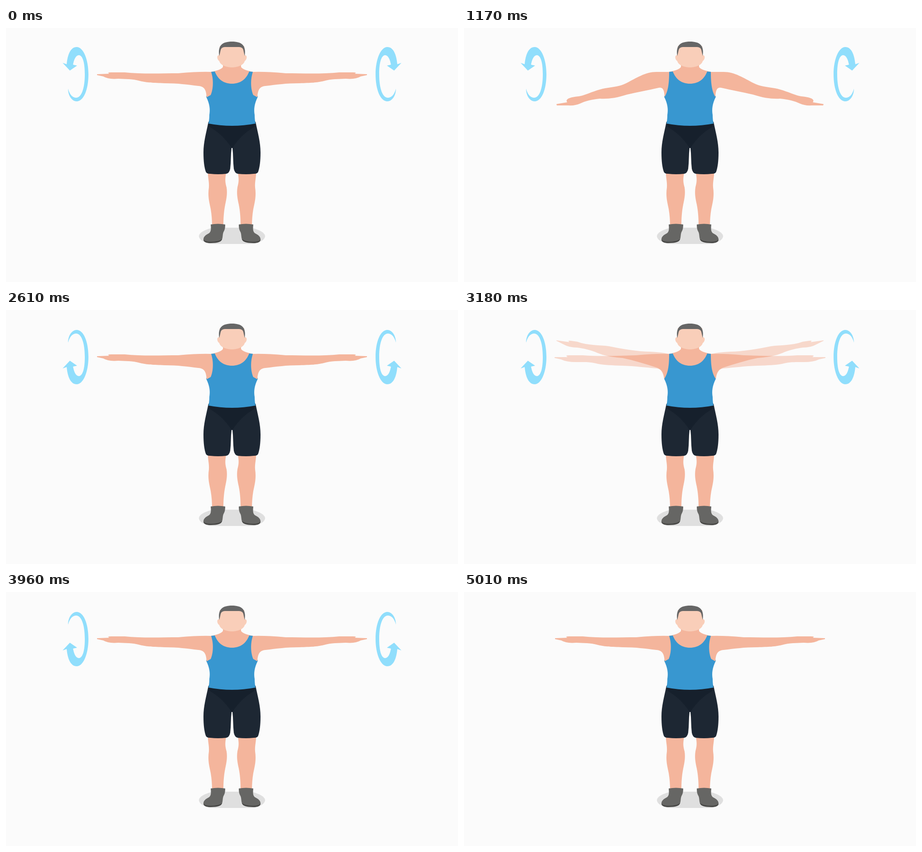
Recreate the animation shown at these times as an HTML page with a canvas. Size 998 by 561 pixels, loop 5040 ms.

```html
<!DOCTYPE html>
<html lang="en">
<head>
<meta charset="utf-8">
<title>Arm circles</title>
<style>
  html, body { margin: 0; width: 100%; height: 100%; overflow: hidden; background: #fbfbfb; }
  canvas { display: block; filter: blur(0.7px); }
</style>
</head>
<body>
<canvas id="stage" width="998" height="561"></canvas>
<script>
const W = 998, H = 561, LOOP = 5040, BLEND = 30;
const ctx = document.getElementById('stage').getContext('2d');

const COLOR = {
  bg: '#fbfbfb', skin: '#f4b59c', face: '#f9ceb9', hair: '#666666', tank: '#3897d0',
  shorts: '#1d2733', hips: '#16202c', shoe: '#666664', sole: '#484846',
  shadow: '#dfdfdf', arrow: '#90defc'
};

// Left-hand shapes are mirrored about the middle of the stage.
const leg = new Path2D('M446 315 C445 330 449 338 448 352 C445 372 449 385 452 400 C454 412 455 424 455 438 L480 438 C480 420 481 405 484 390 C487 376 489 366 487 352 C484 340 483 335 487 315 Z');
const shoe = new Path2D('M452 434 Q468 431 484 434 C484 442 483 446 480 451 C478 456 479 461 477 467 C473 473 463 474 452 474 C444 474 436 472 436 467 C436 461 441 457 447 454 C453 451 453 444 452 434 Z');
const sole = new Path2D('M436 467 Q439 472 452 472 Q470 472 477 466 Q476 475 452 475 Q436 475 436 467 Z');
const arrow = new Path2D('M125 77 L134 80 C136 58 143 42 156 42 C171 42 182 70 182 102 C182 137 171 162 156 162 C146 162 137 150 137 134 C141 148 147 154 155 154 C166 154 174 135 174 102 C174 78 170 61 161 60 C154 60 150 70 148 81 L157 83 L141 94 Z');

const shorts = new Path2D('M447 207 Q499 214 551 207 C556 232 562 252 562 275 C562 295 560 308 557 317 Q556 322 547 322 Q530 324 512 322 Q505 321 503 311 C501 295 502 280 500 265 L498 265 C496 280 497 295 495 311 Q493 321 486 322 Q468 324 451 322 Q442 322 441 317 C438 308 436 295 436 275 C436 252 442 232 447 207 Z');
const hips = new Path2D('M447 208 L551 208 L549 218 Q518 236 500 265 L498 265 Q480 236 449 218 Z');
const chest = new Path2D('M479 74 L519 74 L519 86 Q523 93 546 97 L546 130 L452 130 L452 97 Q475 93 479 86 Z');
const tank = new Path2D('M452 97 L461 96 C468 114 481 123 499 123 C517 123 530 114 537 96 L546 97 L549 130 L556 152 C548 168 547 180 549 192 Q549 203 551 211 Q525 216 499 216 Q473 216 447 211 Q449 203 449 192 C451 180 450 168 442 152 L449 130 Z');
const face = new Path2D('M472 40 L526 40 L527 60 C533 59 533 69 527 73 C525 82 511 87 499 87 C487 87 473 82 471 73 C465 69 465 59 471 60 Z');
const hair = new Path2D('M471 62 C467 38 478 30 499 30 C520 30 531 38 527 62 L525 53 Q524 42 515 42 L483 42 Q474 42 473 53 Z');

const arms = {
  level: new Path2D('M201 102 L228 101 Q222 98 232 98 L262 98 C300 102 345 100 380 100 Q425 96 453 97 C460 118 456 140 452 148 L443 153 C442 138 439 129 425 128 C400 125 380 122 350 122 C325 121 312 121 296 117 C280 112 262 113 248 112 Q226 114 215 107 L201 104 Z'),
  up: new Path2D('M204 67 L233 71 Q227 67 236 68 L250 70 C275 79 300 77 320 80 C350 86 385 92 410 92 Q435 93 453 97 C453 125 450 141 442 152 C440 138 434 130 425 127 C400 119 375 111 350 106 C325 104 310 101 295 95 C280 88 264 85 250 83 Q232 83 220 76 L204 68 Z'),
  front: new Path2D('M200 104 L229 104 Q222 100 232 100 L262 100 C300 103 345 101 380 100 Q425 96 453 97 C453 125 450 141 442 152 C440 138 437 130 425 129 C400 127 380 124 350 123 C325 122 312 122 296 119 C280 114 262 115 248 115 Q226 115 214 109 L200 106 Z'),
  down: new Path2D('M204 168 L228 164 Q224 160 230 156 C240 151 252 152 262 149 C280 143 295 136 312 133 C330 130 345 129 358 122 C380 111 400 97 425 97 Q440 97 453 97 C453 125 450 141 443 152 C442 140 441 130 430 132 C405 138 385 141 360 147 C335 155 318 157 300 156 C282 158 268 161 256 167 Q245 172 230 171 L205 171 Z')
};

// [time, arm pose, arrow direction: 1 backward, -1 forward, 0 hidden]
const steps = [
  [0, 'level', 1], [60, 'down', 1], [330, 'front', 1], [600, 'up', 1],
  [900, 'level', 1], [1140, 'down', 1], [1440, 'front', 1], [1740, 'up', 1],
  [2040, 'level', 0], [2610, 'level', -1], [2910, 'up', -1], [3180, 'front', -1],
  [3480, 'down', -1], [3750, 'level', -1], [4080, 'up', -1], [4380, 'front', -1],
  [4680, 'down', -1], [4980, 'level', 0]
];

function fill(c, path, color) {
  c.fillStyle = color;
  c.fill(path);
}

function pair(c, path, color) {
  fill(c, path, color);
  c.save();
  c.translate(W, 0);
  c.scale(-1, 1);
  fill(c, path, color);
  c.restore();
}

function drawShadow(c) {
  c.save();
  c.beginPath();
  c.rect(426, 441, 146, 36);
  c.clip();
  c.beginPath();
  c.ellipse(499, 460, 73, 23, 0, 0, Math.PI * 2);
  c.fillStyle = COLOR.shadow;
  c.fill();
  c.restore();
}

function drawScene(c, pose, turn) {
  c.fillStyle = COLOR.bg;
  c.fillRect(0, 0, W, H);
  drawShadow(c);
  pair(c, leg, COLOR.skin);
  pair(c, shoe, COLOR.shoe);
  pair(c, sole, COLOR.sole);
  fill(c, shorts, COLOR.shorts);
  fill(c, hips, COLOR.hips);
  fill(c, chest, COLOR.skin);
  fill(c, tank, COLOR.tank);
  pair(c, arms[pose], COLOR.skin);
  fill(c, face, COLOR.face);
  fill(c, hair, COLOR.hair);
  if (!turn) return;
  c.save();
  if (turn < 0) {
    c.translate(0, 206);
    c.scale(1, -1);
  }
  pair(c, arrow, COLOR.arrow);
  c.restore();
}

const cache = {};
function scene([, pose, turn]) {
  const key = pose + turn;
  if (!cache[key]) {
    const layer = document.createElement('canvas');
    layer.width = W;
    layer.height = H;
    drawScene(layer.getContext('2d'), pose, turn);
    cache[key] = layer;
  }
  return cache[key];
}

function render(t) {
  let i = steps.length - 1;
  while (steps[i][0] > t) i--;
  const step = steps[i], prev = steps[i - 1];
  const blending = prev && prev[1] !== step[1] && t - step[0] < BLEND;
  ctx.globalAlpha = 1;
  if (blending) {
    ctx.drawImage(scene(prev), 0, 0);
    ctx.globalAlpha = 0.5;
  }
  ctx.drawImage(scene(step), 0, 0);
}

const start = performance.now();
function tick() {
  render((performance.now() - start) % LOOP);
  requestAnimationFrame(tick);
}
tick();
</script>
</body>
</html>
```
